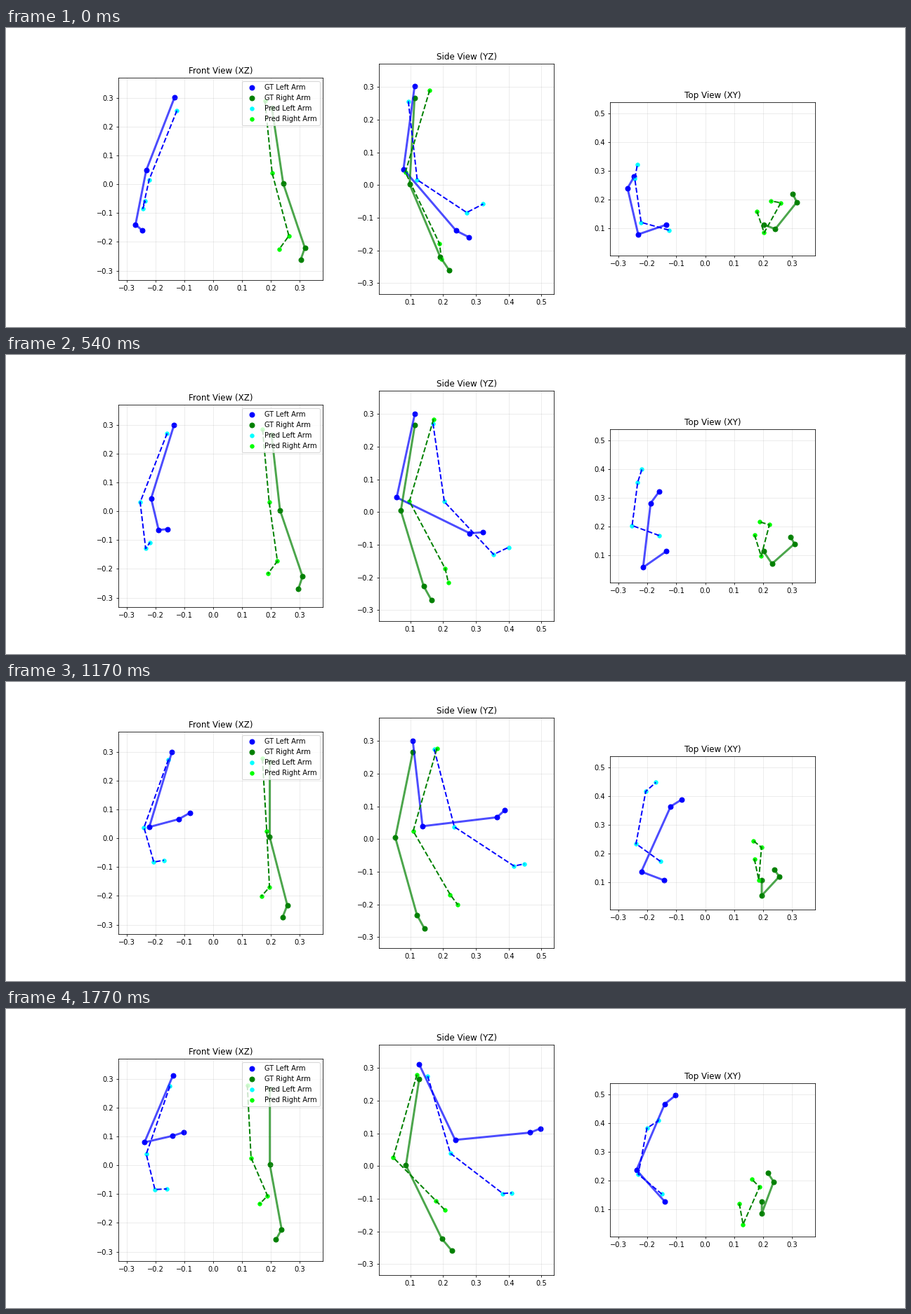
Write a matplotlib script that moves like this. It is 1280 px wide and 427 px high and loops after 1.8 s.

```python
import numpy as np
import matplotlib.pyplot as plt
from matplotlib.animation import FuncAnimation

FRAMES, STEP = 60, 30
LIMITS = [(-0.3295, 0.3805), (0.0047, 0.5385), (-0.3335, 0.3705)]
TICKS = np.arange(-3, 6) / 10


def wave(t, start, end, arc=0, twist=0):
    """Straight move from start to end plus a half and a full sine."""
    u = t / (FRAMES - 1)
    return (start + (end - start) * u
            + arc * np.sin(np.pi * u) + twist * np.sin(2 * np.pi * u))


def bone(length, lean, swing):
    """Hanging bone: lean tilts it along x, swing lifts it along y (degrees)."""
    a, b = np.radians([lean, swing])
    return length * np.array([np.sin(a), np.cos(a) * np.sin(b), -np.cos(a) * np.cos(b)])


def chain(shoulder, *bones):
    return np.cumsum([shoulder, *bones], axis=0)


# Poses are four xyz rows (shoulder, elbow, wrist, hand) in thousandths.
def body_y(t):
    return wave(t, 113, 127, -11, 6)


def gt_left(t):
    return chain(
        [wave(t, -134, -140, -3, 3), body_y(t), wave(t, 302, 311, -7, 2)],
        bone(274, wave(t, -21, -21, 5), wave(t, -7.6, 25.4, -13, -4.3)),
        bone(250, wave(t, -8.5, 23, 10, -3.5), wave(t, 40.5, 95.6, 16, -7)),
        bone(50, wave(t, 27, 49, 6.6, -3), wave(t, 63, 112, 32, -10)),
    )


def gt_right(t):
    return chain(
        [wave(t, 203, 196, -1, 2), body_y(t), 266],
        bone(267, wave(t, 8.5, 0, -1.6, 1.8), wave(t, -3.3, -8.7, -5.3)),
        bone(253, wave(t, 17.2, 9.3, 3, 0.8), wave(t, 22.8, 26, -9.7, 1)),
        bone(51, wave(t, -16, -23, 2), wave(t, 34, 40, -9.5, 1)),
    )


def predicted(t, early, late, entry, leave):
    """Settle from entry, drift from early to late, hold, then leave.

    entry and leave shift the upper and the lower half of the arm.
    """
    early, late = np.array(early), np.array(late)
    return (early + (late - early) * np.interp(t, [12, 45], [0, 1])
            + np.repeat(entry, 2, axis=0) * np.interp(t, [0, 12], [1, 0])
            + np.repeat(leave, 2, axis=0) * np.interp(t, [52, 59], [0, 1]))


def pred_left(t):
    return predicted(
        t,
        early=[(-161, 168, 270), (-257, 195, 30), (-242, 336, -143), (-233, 386, -117)],
        late=[(-154, 174, 275), (-236, 243, 39), (-198, 434, -69), (-157, 461, -67)],
        entry=[(35, -74, -14), (-2, -64, 59)],
        leave=[(4, -21, 0), (-4, -52, -15)],
    )


def pred_right(t):
    return predicted(
        t,
        early=[(171, 168, 286), (196, 94, 35), (230, 202, -174), (196, 208, -221)],
        late=[(170, 184, 275), (183, 112, 22), (187, 226, -169), (160, 253, -197)],
        entry=[(8, -9, 4), (32, -13, -5)],
        leave=[(-52, -64, 4), (1, -48, 63)],
    )


GT = dict(lw=3, alpha=0.7)
PRED = dict(lw=2)
arms = [
    ("GT Left Arm", gt_left, "blue", 50, "b-", GT),
    ("GT Right Arm", gt_right, "green", 50, "g-", GT),
    ("Pred Left Arm", pred_left, "cyan", 30, "b--", PRED),
    ("Pred Right Arm", pred_right, "lime", 30, "g--", PRED),
]
views = [
    ("Front View (XZ)", [0, 2]),
    ("Side View (YZ)", [1, 2]),
    ("Top View (XY)", [0, 1]),
]


def inside(limits):
    return [v for v in TICKS if limits[0] < v < limits[1]]


fig, axes = plt.subplots(1, 3, figsize=(18, 6.0047), dpi=640 / 9)
fig.subplots_adjust(left=0.1247)
parts = []
for ax, (title, dims) in zip(axes, views):
    for label, pose, dot, size, style, line in arms:
        dots = ax.scatter([0] * 4, [0] * 4, c=dot, s=size, label=label)
        bones, = ax.plot([], [], style, **line)
        parts.append((pose, dims, dots, bones))
    xlim, ylim = (LIMITS[d] for d in dims)
    ax.set(title=title, xticks=inside(xlim), yticks=inside(ylim),
           xlim=xlim, ylim=ylim, aspect="equal")
    ax.grid(True, alpha=0.3)
axes[0].legend(loc="upper right")


def update(frame):
    for pose, dims, dots, bones in parts:
        flat = pose(frame)[:, dims] / 1000
        dots.set_offsets(flat)
        bones.set_data(*flat.T)
    return []


anim = FuncAnimation(fig, update, frames=FRAMES, interval=STEP,
                     init_func=lambda: update(0), repeat=True, repeat_delay=0)
plt.show()
```
